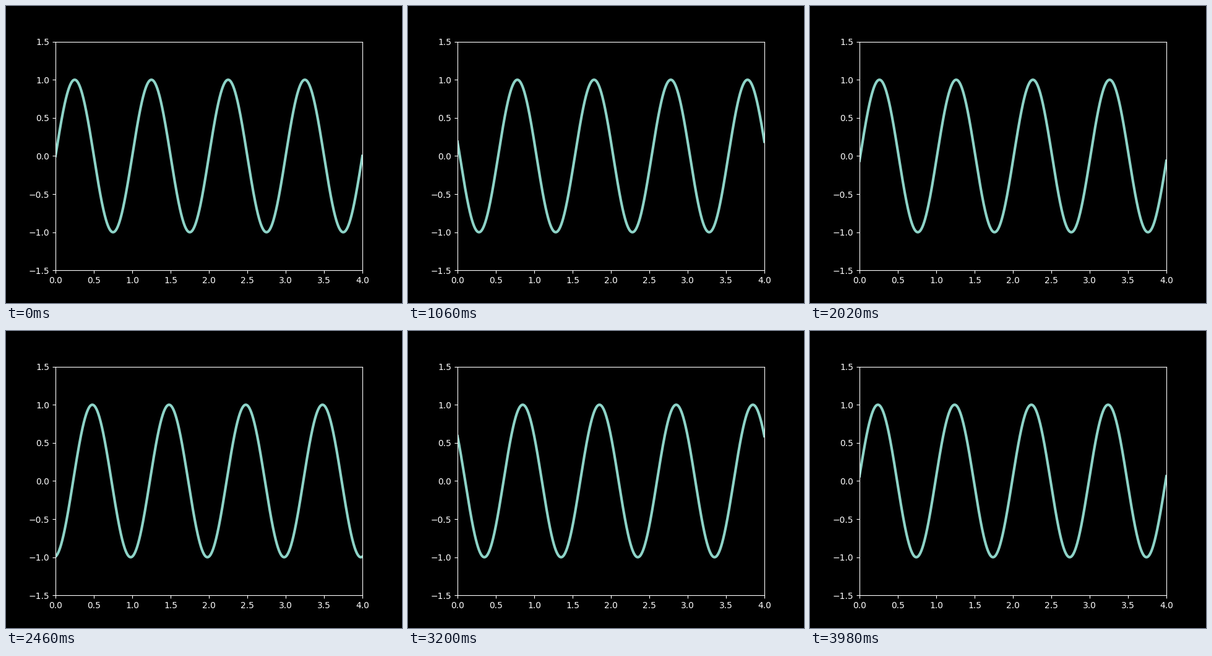
Write a matplotlib script that moves like this. It is 640 px wide and 480 px high and loops after 4000 ms.

```python
import numpy as np
import matplotlib.pyplot as plt
from matplotlib.animation import FuncAnimation

FRAMES = 200
INTERVAL = 20  # ms
SHIFT = 0.01   # wave travel per frame, in x units

plt.style.use("dark_background")

fig = plt.figure(figsize=(6.4, 4.8), dpi=100)
ax = plt.axes(xlim=(0, 4), ylim=(-1.5, 1.5))
x = np.linspace(0, 4, 1000)
line, = ax.plot([], [], lw=3)


def draw(i):
    line.set_data(x, np.sin(2 * np.pi * (x - SHIFT * i)))
    return line,


anim = FuncAnimation(fig, draw, frames=FRAMES, interval=INTERVAL,
                     init_func=lambda: draw(0), repeat=True, repeat_delay=0)

plt.show()
```
